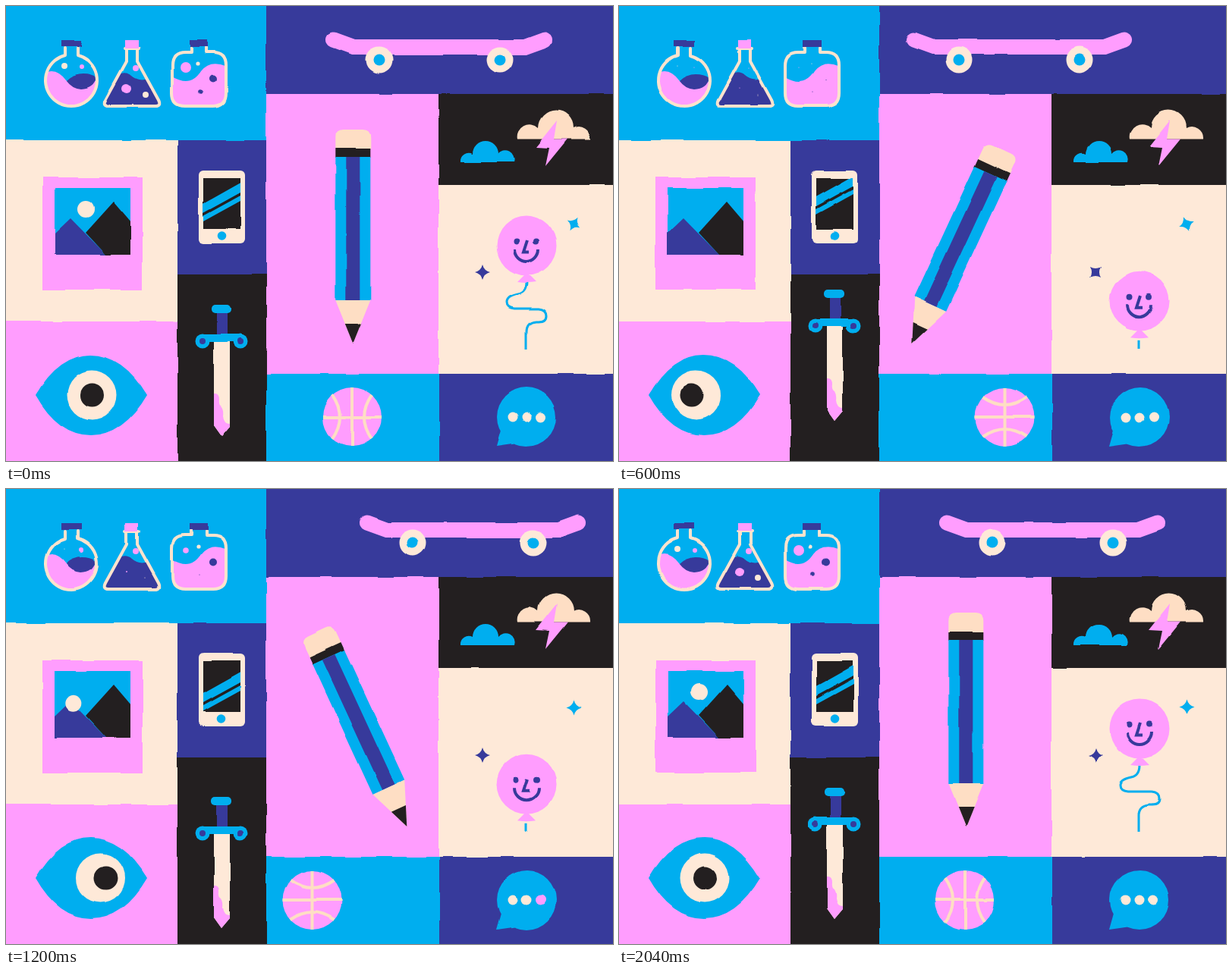
Write an HTML page that moves like this. It is 800x600 px and loops after 2100 ms.

```html
<!DOCTYPE html>
<html lang="en">
<head>
<meta charset="utf-8">
<title>Icon mosaic</title>
<style>
  html, body { margin: 0; width: 100%; height: 100%; overflow: hidden; }
  svg { display: block; width: 800px; height: 600px; }
  .sky { fill: #00aeef } .navy { fill: #373a9b } .pink { fill: #ff9dfe }
  .ink { fill: #231f20 } .cream { fill: #fee9d8 } .peach { fill: #fedec4 }
  .line { fill: none; stroke-width: 4 }
  .glass { stroke: #fee3cd; stroke-linejoin: round; stroke-linecap: round }
</style>
</head>
<body>
<svg viewBox="0 0 800 600">
  <defs>
    <filter id="wobble" filterUnits="userSpaceOnUse" x="-10" y="-10" width="820" height="620" color-interpolation-filters="sRGB">
      <feTurbulence id="noise" type="fractalNoise" baseFrequency=".025" numOctaves="1" seed="1" result="n"/>
      <feDisplacementMap in="SourceGraphic" in2="n" scale="4" xChannelSelector="R" yChannelSelector="G"/>
      <feGaussianBlur stdDeviation=".4"/>
    </filter>
    <path id="flaskA" d="M78 55V65A34 34 0 1 0 94 65V55"/>
    <path id="flaskB" d="M159 56V73L131 124Q127 132 135 132H197Q205 132 201 124L173 73V56"/>
    <path id="flaskC" d="M244 55V61H236Q219 61 219 78V115Q219 132 236 132H273Q290 132 290 115V78Q290 61 273 61H264V55"/>
    <clipPath id="inA"><use href="#flaskA"/></clipPath>
    <clipPath id="inB"><use href="#flaskB"/></clipPath>
    <clipPath id="inC"><use href="#flaskC"/></clipPath>
    <clipPath id="photo"><rect x="64" y="240" width="100" height="88"/></clipPath>
    <clipPath id="screen"><rect x="260" y="227" width="49" height="67"/></clipPath>
    <path id="spark" d="M0-10Q2-2 10 0Q2 2 0 10Q-2 2-10 0Q-2-2 0-10Z"/>
  </defs>
  <g filter="url(#wobble)">
    <g id="tiles"></g>

    <!-- flasks -->
    <g clip-path="url(#inA)">
      <path class="pink" d="M50 89Q66 80 80 99Q92 110 122 98V136H50Z"/>
      <path class="navy" d="M80 99Q89 90 101 90Q112 90 119 95Q116 109 99 110Q87 109 80 99Z"/>
    </g>
    <path class="navy" clip-path="url(#inB)" d="M140 96Q156 83 166 92T190 95L210 134H122Z"/>
    <path class="pink" clip-path="url(#inC)" d="M217 92C235 103 247 101 257 86Q269 70 292 80V134H217Z"/>
    <g id="bubbles"></g>
    <g class="line glass">
      <use href="#flaskA"/><use href="#flaskB"/><use href="#flaskC"/><path d="M157 56H175"/>
    </g>
    <path class="navy" d="M73 45H99V53H73ZM242 45H266V54H242Z"/>
    <path class="pink" d="M157 45H174V56H157Z"/>

    <g id="board">
      <path d="M432 44.5L458 54H684L710 44.5" fill="none" stroke="#ff9dfe" stroke-width="20" stroke-linecap="round"/>
      <circle class="cream" cx="492" cy="71" r="17.5"/><circle class="sky" cx="492" cy="71" r="7.5"/>
      <circle class="cream" cx="651" cy="71" r="17.5"/><circle class="sky" cx="651" cy="71" r="7.5"/>
    </g>

    <!-- picture -->
    <rect class="pink" x="48" y="226" width="132" height="148"/>
    <g clip-path="url(#photo)">
      <rect class="sky" x="64" y="240" width="100" height="88"/>
      <path class="navy" d="M62 302L85 280L132 328H62Z"/>
      <path class="ink" d="M105 299L142 258L166 286V328H132Z"/>
      <circle id="sun" class="cream" r="11"/>
    </g>

    <!-- phone -->
    <rect class="cream" x="254" y="217" width="61" height="96" rx="6"/>
    <rect class="ink" x="260" y="227" width="49" height="67"/>
    <g clip-path="url(#screen)">
      <path id="glare" class="sky" d="M258 262L311 232V245L258 274ZM258 278L311 249V256L258 285Z"/>
    </g>
    <circle class="sky" cx="284.5" cy="303" r="5.8"/>

    <g id="sword">
      <path class="cream" d="M274 441H295V554L284 567L274 553Z"/>
      <path class="pink" d="M274 511Q281 510 281 519Q280 526 284 528Q287 533 286 540Q287 550 295 550V554L284 567L274 553Z"/>
      <rect class="navy" x="278" y="402" width="14" height="34"/>
      <rect class="sky" x="271" y="394" width="26" height="11" rx="5"/>
      <rect class="sky" x="259" y="433" width="50" height="10"/>
      <circle class="sky" cx="259" cy="442" r="9.5"/><circle class="navy" cx="259" cy="442" r="4"/>
      <circle class="sky" cx="309" cy="442" r="9.5"/><circle class="navy" cx="309" cy="442" r="4"/>
    </g>

    <!-- eye -->
    <path class="sky" d="M39 513Q70 460 112 460T186 513Q155 566 112 566T39 513Z"/>
    <circle id="iris" class="cream" cy="513" r="32.5"/>
    <circle id="pupil" class="ink" cy="513" r="15.5"/>

    <!-- pencil, origin at its tip -->
    <g id="pencil">
      <path class="peach" d="M-23-256V-272Q-23-282-13-282H13Q23-282 23-272V-256Z"/>
      <rect class="ink" x="-23" y="-257" width="46" height="12"/>
      <rect class="sky" x="-23" y="-246" width="46" height="189"/>
      <rect class="navy" x="-9" y="-246" width="18" height="189"/>
      <path class="peach" d="M-23-57H23L0 0Z"/>
      <path class="ink" d="M-10.5-26H10.5L0 0Z"/>
    </g>

    <!-- weather -->
    <path class="sky" d="M599 206A11 11 0 0 1 615 195A17 17 0 0 1 649 195A12 12 0 0 1 670 206Z"/>
    <path class="peach" d="M674 175.5A16 16 0 0 1 701 161A23.5 23.5 0 0 1 748 161A15 15 0 0 1 770 175.5Z"/>
    <path id="bolt" class="pink" d="M726 151L698 186L716 187L711 211L740 175.5H722Z"/>

    <!-- balloon -->
    <path id="string" pathLength="1" fill="none" stroke="#00aeef" stroke-width="3"
      d="M686 364Q686 378 675 380Q660 383 660 391Q660 398 670 399H702Q712 400 712 408Q712 416 702 416H698Q685 417 685 430V452"/>
    <g id="balloon">
      <path class="pink" d="M686 352L674 364Q686 366 698 364Z"/>
      <circle class="pink" cx="686" cy="316" r="39.5"/>
      <circle class="navy" cx="672.5" cy="310.5" r="4"/><circle class="navy" cx="699" cy="310.5" r="4"/>
      <path class="line" stroke="#373a9b" d="M687 309L682 324.5H690M670 321A16 16 0 0 0 702 321"/>
    </g>
    <use id="sparkA" class="sky" href="#spark"/>
    <use id="sparkB" class="navy" href="#spark"/>

    <g id="ball">
      <circle class="pink" r="39"/>
      <path class="line" stroke="#fedec4" d="M0-39V39M-39 0H39M-26-29Q-6 0-26 29M26-29Q6 0 26 29"/>
    </g>

    <!-- chat -->
    <circle class="sky" cx="686" cy="542" r="39"/>
    <path class="sky" d="M653 556L646 581L674 577Z"/>
    <g id="dots"></g>
  </g>
</svg>
<script>
  const LOOP = 2100;
  const $ = id => document.getElementById(id);
  const place = (id, x, y, turn = 0) =>
    $(id).setAttribute('transform', `translate(${x} ${y}) rotate(${turn})`);

  function add(parent, tag, attrs) {
    const el = document.createElementNS('http://www.w3.org/2000/svg', tag);
    for (const key in attrs) el.setAttribute(key, attrs[key]);
    return $(parent).appendChild(el);
  }

  // left, top, right, bottom; outer edges bleed past the stage
  [
    ['sky', -20, -20, 343, 177], ['navy', 343, -20, 820, 116],
    ['cream', -20, 177, 226, 416], ['navy', 226, 177, 343, 354],
    ['pink', -20, 416, 226, 620], ['ink', 226, 354, 343, 620],
    ['pink', 343, 116, 570, 485], ['ink', 570, 116, 820, 236],
    ['cream', 570, 236, 820, 485], ['sky', 343, 485, 571, 620],
    ['navy', 571, 485, 820, 620]
  ].forEach(([cls, l, t, r, b]) =>
    add('tiles', 'path', { class: cls, d: `M${l} ${t}H${r}V${b}H${l}Z` }));

  // color, x, y, radius, delay
  const bubbles = [
    ['pink', 99, 81, 3, 0], ['cream', 77, 79, 4, 1],
    ['pink', 171, 82, 4, 0], ['pink', 159, 109, 6, 1], ['cream', 183, 117, 4, 1],
    ['pink', 237, 81, 7, .6], ['cream', 253, 76, 2.6, 0],
    ['navy', 273, 96.5, 5, 0], ['navy', 256, 113, 2.8, 1]
  ].map(([cls, cx, cy, r, delay]) =>
    ({ r, delay, el: add('bubbles', 'circle', { class: cls, cx, cy }) }));

  const dots = [668, 686, 704.5].map(cx => add('dots', 'circle', { cx, cy: 542, r: 6.5 }));

  const span = (t, from, to) => Math.min(1, Math.max(0, (t - from) / (to - from)));
  const smooth = u => u * u * (3 - 2 * u);

  // cubic-bezier(x1, 0, x2, 1)
  function ease(p, x1, x2) {
    let lo = 0, hi = 1;
    for (let i = 0; i < 24; i++) {
      const u = (lo + hi) / 2, v = 1 - u;
      if (3 * u * v * v * x1 + 3 * u * u * v * x2 + u ** 3 < p) lo = u; else hi = u;
    }
    return smooth(lo);
  }

  // shared swing: 0, -1, 1, 0
  const swingAt = t =>
    -ease(span(t, 0, 600), .2, 0) +
    2 * ease(span(t, 600, 1200), .45, 0) -
    ease(span(t, 1200, 1800), .45, 0);

  const sinkAt = t => ease(span(t, 60, 900), .72, .28) - ease(span(t, 900, 1740), .72, .28);

  const sunShift = t => t < 600 ? 42 * (t / 270) ** 2 : -41 * (Math.max(0, 1800 - t) / 810) ** 3;

  const bubbleScale = (t, delay) =>
    1 - smooth(span(t, 0, 360 + 200 * delay)) +
    smooth(span(t, 750 + 310 * delay, 1130 + 510 * delay));

  function draw(t) {
    const s = swingAt(t), sink = sinkAt(t), dx = sunShift(t);

    $('noise').setAttribute('seed', 1 + Math.floor(t / 60));
    place('board', 44 * s, 0);
    place('pencil', 457.3 + 71 * s, 445, -24.8 * s);
    place('ball', 456 - 52.5 * s, 542, -90 * s);
    place('sword', 0, (s < 0 ? 20 : 12) * s);
    place('glare', 0, 9 * s);
    place('sun', 106 + dx, 268 + .00777 * dx * dx - .755 * dx);
    $('iris').setAttribute('cx', 113 + 11.5 * s);
    $('pupil').setAttribute('cx', 113.5 + 17.5 * s);

    place('balloon', 0, 86.5 * sink);
    const cut = Math.max(0, sink) ** .42;
    $('string').setAttribute('stroke-dasharray', `${1 - cut} 2`);
    $('string').setAttribute('stroke-dashoffset', -cut);
    $('string').style.display = cut > .985 ? 'none' : '';
    place('sparkA', 748.5, 287.5, 30 + 60 * smooth(span(t, 0, 1000)));
    place('sparkB', 628, 351, 90 * smooth(span(t, 0, 1200)));

    $('bolt').style.display = t >= 900 && t < 1080 ? 'none' : '';
    for (const b of bubbles) b.el.setAttribute('r', Math.max(.6, b.r * bubbleScale(t, b.delay)));
    dots.forEach((dot, i) => {
      const on = 150 + 510 * i;
      dot.setAttribute('class', t >= on && t < on + 345 ? 'pink' : 'cream');
    });
  }

  const start = performance.now();
  let shown = -1;
  function tick() {
    const now = (performance.now() - start) % LOOP;
    const step = now < 1680 ? 30 : 60;
    const t = Math.floor(now / step) * step;
    if (t !== shown) draw(shown = t);
    requestAnimationFrame(tick);
  }
  tick();
</script>
</body>
</html>
```
